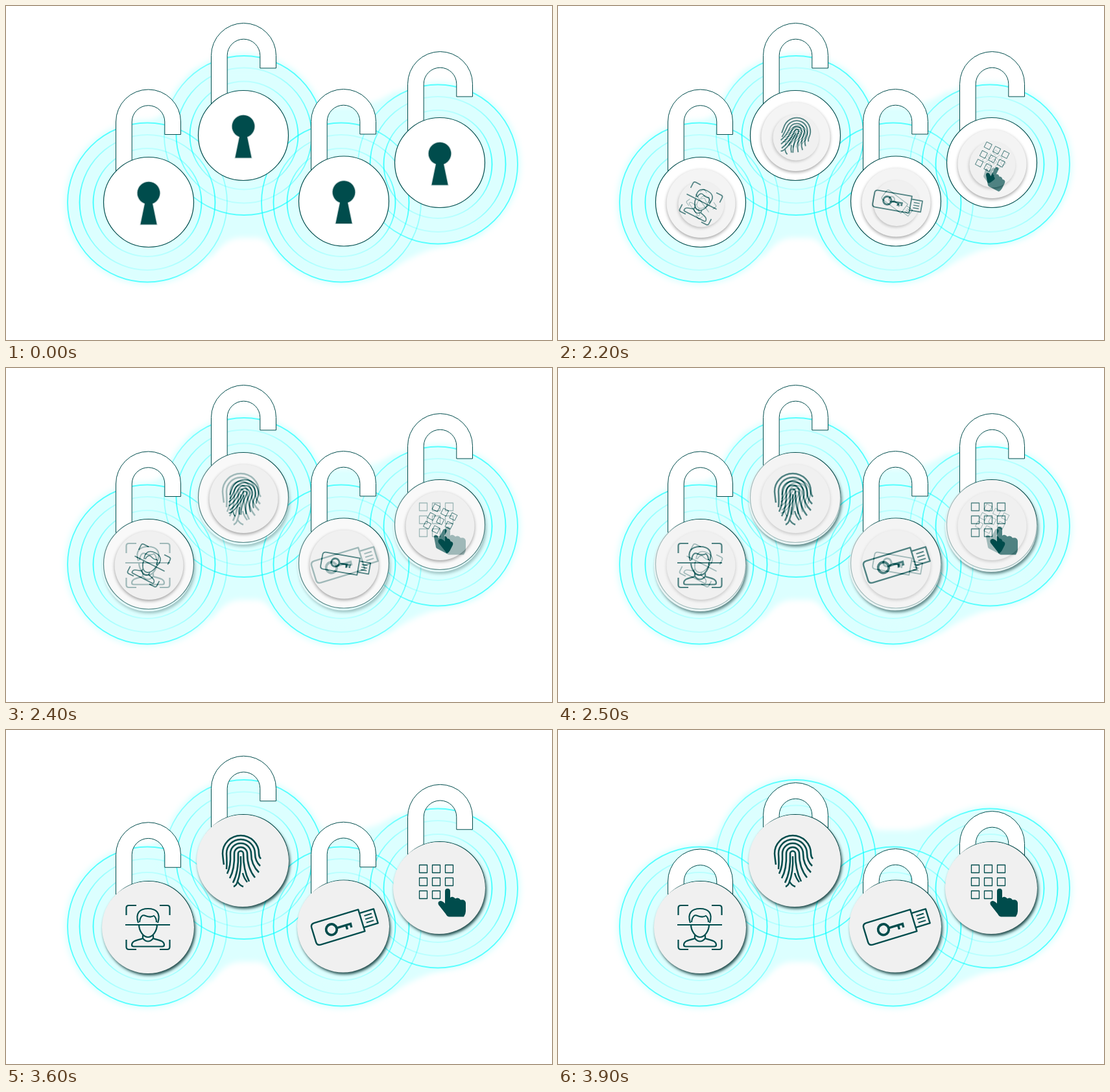
Write an HTML page with a canvas that moves like this. It is 842 px wide and 516 px high and loops after 4.9 s.

```html
<!DOCTYPE html>
<html lang="en">
<head>
<meta charset="utf-8">
<title>Padlocks</title>
<style>
  html, body { margin: 0; width: 100%; height: 100%; overflow: hidden; background: #fff; }
  canvas { display: block; }
</style>
</head>
<body>
<canvas id="stage" width="842" height="516"></canvas>
<script>
const W = 842, H = 516;
const TAU = Math.PI * 2;
const LOOP = 4900, STEP = 100;
const DARK = '#004c4c', DISC = '#f0f0f0';

const main = document.getElementById('stage').getContext('2d');
const layer = Object.assign(document.createElement('canvas'), { width: W, height: H }).getContext('2d');
let ctx = main;

// x, y: body centre; rx, ry: ring centre; sx, top: shackle; side: where the outer ring is strongest
const locks = [
  { x: 220, y: 303, rx: 218, ry: 303.5, sx: 219.5, top: 129, side: -1, icon: drawFace },
  { x: 366, y: 200, rx: 367, ry: 200, sx: 366.5, top: 26.5, side: 1, icon: drawFingerprint },
  { x: 521, y: 301.5, rx: 517, ry: 303.5, sx: 520.5, top: 128.5, side: -1, icon: drawUsb },
  { x: 669, y: 242, rx: 666, ry: 244.5, sx: 669.5, top: 70.5, side: 1, icon: drawKeypad }
];

// Three sizes of the turning badge
const stages = [
  { r: 35.5, dx: 1, dy: 3, scale: 0.5, turn: 54, shadow: [-1, 2, 4, 'rgba(0,0,0,.6)'] },
  { r: 53, dx: 0.5, dy: 2, scale: 0.75, turn: 27, shadow: [0, 2, 5, 'rgba(0,0,0,.55)'] },
  { r: 71, dx: -1, dy: 2, scale: 1, turn: 0, shadow: [2, 3, 4, 'rgba(0,45,45,.85)'] }
];

function circle(x, y, r) {
  ctx.beginPath();
  ctx.arc(x, y, r, 0, TAU);
}

function line(d, width) {
  ctx.lineWidth = width;
  ctx.stroke(new Path2D(d));
}

function drawHalo() {
  ctx.save();
  ctx.filter = 'blur(4px)';
  ctx.fillStyle = '#dcffff';
  for (const l of locks) {
    circle(l.rx, l.ry, 127);
    ctx.fill();
  }
  ctx.fill(new Path2D('M225 178 Q262 160 290 100 H440 Q465 155 500 155 H540 Q575 150 602 132 ' +
    'L735 350 Q640 375 590 408 L425 388 Q405 358 385 358 H360 Q340 358 315 388Z'));
  ctx.restore();
}

function cyan(alpha) {
  return `rgba(0,255,255,${alpha})`;
}

function drawRings({ rx, ry, side }) {
  ctx.lineWidth = 1.8;
  const outer = ctx.createLinearGradient(rx + side * 123, 0, rx - side * 123, 0);
  outer.addColorStop(0, cyan(0.65));
  outer.addColorStop(0.65, cyan(0.6));
  outer.addColorStop(1, cyan(0.3));
  ctx.strokeStyle = outer;
  circle(rx, ry, 123);
  ctx.stroke();
  for (const r of [104.5, 83.5]) {
    const inner = ctx.createLinearGradient(0, ry - r, 0, ry + r);
    inner.addColorStop(0, cyan(0.15));
    inner.addColorStop(0.5, cyan(0.75));
    inner.addColorStop(1, cyan(0.15));
    ctx.strokeStyle = inner;
    circle(rx, ry, r);
    ctx.stroke();
  }
}

function drawShackle({ sx, y, top }, drop) {
  const cy = top + 50 + drop, end = cy + 19.5;
  ctx.beginPath();
  ctx.moveTo(sx - 50, y);
  ctx.arc(sx, cy, 50, Math.PI, 0);
  ctx.lineTo(sx + 50, end);
  ctx.lineTo(sx + 25.3, end);
  ctx.arc(sx, cy, 25.3, 0, Math.PI, true);
  ctx.lineTo(sx - 25.3, y);
  ctx.fillStyle = '#fff';
  ctx.fill();
  ctx.strokeStyle = DARK;
  ctx.lineWidth = 1;
  ctx.stroke();
}

function drawBody({ x, y }) {
  circle(x, y, 69.5);
  ctx.fillStyle = '#fff';
  ctx.fill();
  ctx.strokeStyle = DARK;
  ctx.lineWidth = 1.2;
  ctx.stroke();
}

function drawKeyhole({ x, y }) {
  ctx.beginPath();
  ctx.arc(x, y - 14, 17.3, 0.39 * Math.PI, 0.61 * Math.PI, true);
  ctx.lineTo(x - 12.5, y + 34.5);
  ctx.lineTo(x + 12.5, y + 34.5);
  ctx.closePath();
  ctx.strokeStyle = '#c3d2d2';
  ctx.lineWidth = 2;
  ctx.stroke();
  ctx.fillStyle = DARK;
  ctx.fill();
}

// Icons are drawn around the badge centre at full size
function drawFace() {
  for (const sx of [-1, 1]) for (const sy of [-1, 1]) {
    ctx.save();
    ctx.scale(sx, sy);
    line('M-33.5 -19 V-30 Q-33.5 -34 -29.5 -34 H-18', 2.2);
    ctx.restore();
  }
  line('M-35 -4 H34', 2.2);
  line('M-15 -7 C-20 -22 -13 -29 0 -29 C13 -29 20 -22 15 -7', 2.2);
  line('M-13 -8 C-12 -18 -8 -20 -4 -18 C1 -16 6 -16 9 -18 Q13 -15 13 -8', 2);
  line('M-14 -5 C-14 6 -7 15 0 15 C7 15 14 6 14 -5', 2.2);
  line('M-8 12 V17 C-16 20 -25 20 -25 27 Q-25 29.5 -22 29.5 H22 Q25 29.5 25 27 C25 20 16 20 8 17 V12', 2.2);
  line('M-8 17 Q0 26 8 17', 2);
}

function drawFingerprint() {
  ctx.save();
  ctx.translate(-3, -11);
  const left = [[-26, 17], [-22, 24], [-21, 31], [-17, 38], [-12, 45]];
  const right = [[31, 8], [30, 19], [28, 29], [22, 37], [13, 43]];
  left.forEach(([lx, ly], i) => {
    const r = 28 - 6 * i, [ex, ey] = right[i];
    line(`M${lx} ${ly} Q${-r + 1} ${ly * 0.62} ${-r} 0 A${r} ${r} 0 0 1 ${r} 0 ` +
      `Q${r} ${ey * 0.6} ${ex} ${ey}`, 2.5);
  });
  line('M0 4 C1 22 -2 36 -6 46 Q-8 50 -11 51', 2.4);
  line('M-5 43 Q-2 49 4 51', 2.4);
  line('M3 30 Q5 38 10 44', 2.4);
  ctx.restore();
}

function drawUsb() {
  ctx.save();
  ctx.translate(-9, 2);
  ctx.rotate(-17 * Math.PI / 180);
  line('M39 -17.5 V17.5 H-32 Q-38 17.5 -38 11.5 V-11.5 Q-38 -17.5 -32 -17.5Z', 2.4);
  line('M39 -11.5 H62 V11.5 H39', 2.4);
  line('M45 -5.5 H57 M45 0 H57 M45 5.5 H57', 2);
  circle(-9.5, 0, 8.3);
  ctx.lineWidth = 3.8;
  ctx.stroke();
  line('M-1 0 H23 M14 0 V7 M21 0 V6', 3.4);
  ctx.restore();
}

function drawKeypad() {
  ctx.lineWidth = 1.3;
  for (let i = 0; i < 8; i++) {
    ctx.strokeRect(-30.5 + 20 * (i % 3), -35.5 + 20 * Math.floor(i / 3), 12, 12);
  }
  ctx.fill(new Path2D('M9 5 Q9 1 13 1 Q17 1 17 5 V15 Q21 12 25 16.5 Q30 14 33 18.5 ' +
    'Q40 17 41 23 V36 Q41 40 38 44.5 H15 Q12 44 10 40 L-1 26 Q-3 21 2 20 Q5 20 9 24Z'));
}

function drawBadge(lock, stage) {
  const [sx, sy, blur, color] = stage.shadow;
  ctx.save();
  ctx.translate(lock.x + stage.dx, lock.y + stage.dy);
  ctx.save();
  ctx.shadowOffsetX = sx;
  ctx.shadowOffsetY = sy;
  ctx.shadowBlur = blur;
  ctx.shadowColor = color;
  ctx.fillStyle = DISC;
  circle(0, 0, stage.r);
  ctx.fill();
  ctx.restore();
  ctx.rotate(stage.turn * Math.PI / 180);
  ctx.scale(stage.scale, stage.scale);
  ctx.strokeStyle = ctx.fillStyle = DARK;
  ctx.lineJoin = 'round';
  lock.icon();
  ctx.restore();
}

// Badges are flattened first, so that no shadow shows through a faded disc
function drawBadges(stage, alpha) {
  ctx = layer;
  ctx.clearRect(0, 0, W, H);
  for (const lock of locks) drawBadge(lock, stage);
  ctx = main;
  ctx.globalAlpha = alpha;
  ctx.drawImage(layer.canvas, 0, 0);
  ctx.globalAlpha = 1;
}

function render(t) {
  // Each badge size fades in over the previous one in thirds
  const thirds = Math.min((t - 2000) / STEP, 6);
  const base = Math.floor(thirds / 3), fade = thirds % 3 / 3;
  const drop = 13.75 * Math.max(0, Math.min(4, (t - 3500) / STEP));

  ctx.fillStyle = '#fff';
  ctx.fillRect(0, 0, W, H);
  drawHalo();
  locks.forEach(drawRings);
  for (const lock of locks) {
    drawShackle(lock, drop);
    drawBody(lock);
    if (thirds < 0) drawKeyhole(lock);
  }
  if (thirds < 0) return;
  drawBadges(stages[base], 1);
  if (fade > 0) drawBadges(stages[base + 1], fade);
}

const start = performance.now();
let last = -1;
function tick() {
  const t = Math.floor(((performance.now() - start) % LOOP) / STEP) * STEP;
  if (t !== last) render(last = t);
  requestAnimationFrame(tick);
}
tick();
</script>
</body>
</html>
```
